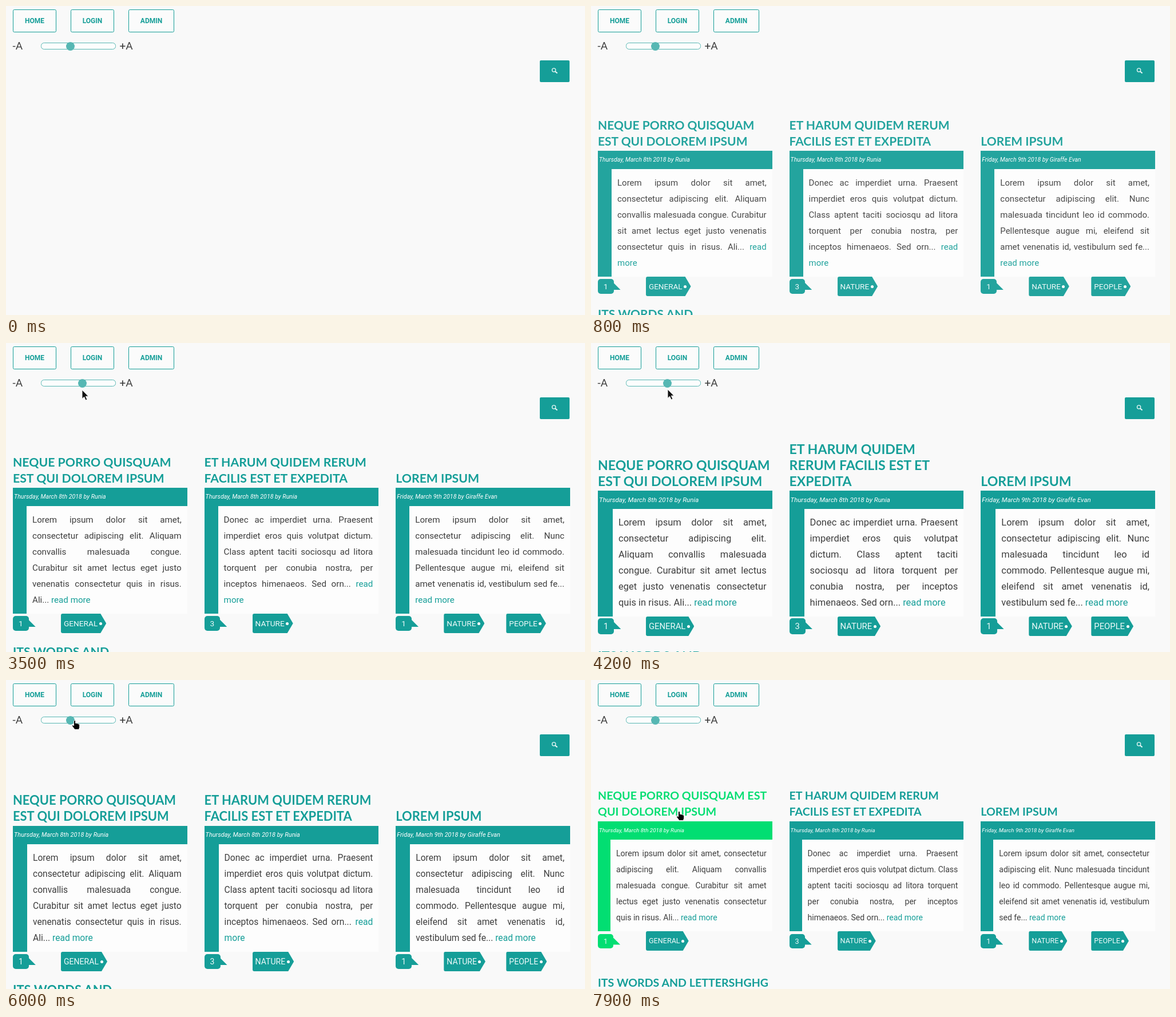
An HTML page that plays this animation: 1012 by 540 pixels, repeating every 8 s.

```html
<!DOCTYPE html>
<html lang="en">
<head>
<meta charset="utf-8">
<title>Blog text size</title>
<style>
  :root { --teal: #159e98; --accent: var(--teal); }
  html, body { margin: 0; width: 100%; height: 100%; overflow: hidden; background: #f9f9f9; }
  #stage { position: relative; width: 1012px; height: 540px; overflow: hidden;
    font-family: Roboto, sans-serif; color: #3e3e3e; background: #f9f9f9; }
  #stage > svg { position: absolute; left: 0; top: 0; }
  .card { position: absolute; width: 304.7px; line-height: 28px; }
  .card h2 { position: absolute; bottom: 100%; width: 100%; margin: 0 0 3px; color: var(--accent);
    font: 700 1.4em/28px Lato, sans-serif; text-transform: uppercase; }
  .date { padding: 2px; height: 28px; background: var(--accent); color: #fff; }
  .date i { font-size: .7em; display: block; line-height: 28px; }
  .text { padding: 10px; border-left: 1.6em solid var(--accent); background: #fdfdfd; text-align: justify; }
  .text span { color: var(--teal); }
  .foot { position: relative; height: 34px; display: flex; align-items: center; color: #eefafa; }
  .count { position: relative; padding: 5px 10px; border-radius: 5px; background: var(--accent);
    font-size: .9em; line-height: normal; }
  .count::after { content: ""; position: absolute; left: calc(100% - 1px); top: 7px; width: 13px; height: 12px;
    background: var(--accent); clip-path: polygon(0 0, 1px 0, 100% 100%, 0 100%); }
  .tag { position: absolute; top: 0; height: 34px; line-height: 34px; padding: 0 15px 0 5px;
    border-radius: 3px 0 0 3px; background: var(--teal);
    clip-path: polygon(0 0, calc(100% - 10px) 0, 100% 50%, calc(100% - 10px) 100%, 0 100%); }
  .tag::after { content: ""; position: absolute; right: 7.5px; top: 14.5px; width: 5px; height: 5px;
    border-radius: 50%; background: #fff; }
</style>
</head>
<body>
<div id="stage">
  <svg width="1012" height="540" font-family="Roboto, sans-serif">
    <g id="nav" font-size="12" font-weight="700" text-anchor="middle"></g>
    <g font-size="19" fill="#3e3e3e">
      <text x="11.5" y="76">-A</text>
      <text x="198.5" y="76">+A</text>
    </g>
    <rect x="61.5" y="64.5" width="130" height="11" rx="5" fill="#fdfdfd" stroke="#56b7b3"/>
    <circle id="thumb" cy="70.5" r="7.5" fill="#56b7b3"/>
    <rect x="933" y="95" width="52" height="38" rx="2" fill="#159e98"/>
    <g fill="none" stroke="#e4f5f4">
      <circle cx="957.6" cy="112" r="3.1" stroke-width="1.3"/>
      <path d="M960 114.4L963.6 117.6" stroke-width="2"/>
    </g>
  </svg>
  <div id="cards"></div>
  <svg width="1012" height="540">
    <path id="arrow" d="M0 0V15.5L3.6 12.2L6.2 18L8.8 16.8L6.3 11.2H11Z" fill="#111" stroke="#fff" stroke-width=".9"/>
    <path id="hand" d="M3.5 1.6Q5 -.6 6.5 1.6V5.6Q8 4.7 9 6Q10.4 5.4 11.2 6.7Q13.6 6.3 13.6 8.6V12.5L12.4 16.5H5.2L.6 10.4Q.3 8.4 2.2 8.8L3.5 10Z" fill="#000" stroke="#fff" stroke-width=".9"/>
  </svg>
</div>
<script>
const LOOP = 8000, STEP = 100;
const TEAL = '#159e98', GREEN = '#02de72';
const COLUMNS = [12, 346.6, 681.3];
const $ = id => document.getElementById(id);

const posts = [
  { title: 'Neque porro quisquam est qui dolorem ipsum', date: 'Thursday, March 8th 2018 by Runia', count: 1, tags: ['GENERAL'],
    text: 'Lorem ipsum dolor sit amet, consectetur adipiscing elit. Aliquam convallis malesuada congue. Curabitur sit amet lectus eget justo venenatis consectetur quis in risus. Ali...' },
  { title: 'Et harum quidem rerum facilis est et expedita', date: 'Thursday, March 8th 2018 by Runia', count: 3, tags: ['NATURE'],
    text: 'Donec ac imperdiet urna. Praesent imperdiet eros quis volutpat dictum. Class aptent taciti sociosqu ad litora torquent per conubia nostra, per inceptos himenaeos. Sed orn...' },
  { title: 'Lorem ipsum', date: 'Friday, March 9th 2018 by Giraffe Evan', count: 1, tags: ['NATURE', 'PEOPLE'],
    text: 'Lorem ipsum dolor sit amet, consectetur adipiscing elit. Nunc malesuada tincidunt leo id commodo. Pellentesque augue mi, eleifend sit amet venenatis id, vestibulum sed fe...' },
  { title: 'Its words and lettershghg' }
];

const postBody = p => `
  <div class="date"><i>${p.date}</i></div>
  <div class="text">${p.text} <span>read more</span></div>
  <div class="foot"><b class="count" style="font-weight:400">${p.count}</b>${
    p.tags.map((tag, i) => `<div class="tag" style="left:${84 + 109 * i}px">${tag}</div>`).join('')}</div>`;

$('cards').innerHTML = posts.map(p =>
  `<div class="card"><h2>${p.title}</h2>${p.text ? postBody(p) : ''}</div>`).join('');
$('nav').innerHTML = [['HOME', 12, 76], ['LOGIN', 113, 76], ['ADMIN', 214, 80]].map(([label, x, w]) =>
  `<g><rect x="${x + .5}" y="6.5" width="${w - 1}" height="39" rx="2"/><text x="${x + w / 2}" y="30">${label}</text></g>`).join('');

const cards = [...document.querySelectorAll('.card')];
const texts = [...document.querySelectorAll('.text')];
const tags = [...document.querySelectorAll('.tag')];
const buttons = [...$('nav').children];

const clamp = v => Math.min(1, Math.max(0, v));

// cubic-bezier(.25, .1, .25, 1)
function ease(v) {
  v = clamp(v);
  if (v === 0 || v === 1) return v;
  const curve = (u, a, b) => 3 * u * (1 - u) ** 2 * a + 3 * u * u * (1 - u) * b + u ** 3;
  let lo = 0, hi = 1;
  for (let i = 0; i < 24; i++) {
    const mid = (lo + hi) / 2;
    if (curve(mid, .25, .25) < v) lo = mid; else hi = mid;
  }
  return curve(lo, .1, 1);
}

// Linear interpolation through [input, ...outputs] rows.
function track(rows, v) {
  const next = rows.findIndex(r => r[0] > v);
  if (next === 0) return rows[0].slice(1);
  if (next < 0) return rows[rows.length - 1].slice(1);
  const a = rows[next - 1], b = rows[next], k = (v - a[0]) / (b[0] - a[0]);
  return a.slice(1).map((n, i) => n + (b[i + 1] - n) * k);
}

const fontSize = t => t < 5460
  ? 15 + 2 * ease((t - 3300) / 2000)
  : 17 - 3 * ease((t - 5460) / 2000);

const hoveredSize = t => t < 6280 ? fontSize(t) : 14.95 - .95 * ease((t - 6620) / 2000);

const sliderValue = t =>
  t < 3100 ? 14 : t < 3200 ? 15 : t < 3300 ? 16 : t < 5300 ? 17 : t < 5400 ? 16 : t < 5460 ? 15 : 14;

const barTop = [[14, 247.4], [15, 252.8], [15.67, 255], [17, 260]];

const pointer = [
  [2200, 158, 10], [2300, 148, 30], [2400, 139, 50], [2500, 129, 66], [2600, 122, 71], [3000, 122, 71],
  [3300, 130, 74], [3500, 133, 82], [4700, 135, 80], [4900, 134, 76], [5000, 134, 75], [5200, 133, 73],
  [5460, 115, 70], [6000, 115, 70], [6300, 128, 150], [6600, 137, 215], [7000, 139, 222], [7300, 149, 229]
];
const isHand = t => (t >= 2900 && t < 3400) || (t >= 4900 && t < 6100) || t >= 7200;

function place(card, x, y, size) {
  card.style.left = x + 'px';
  card.style.top = Math.round(y) + 'px';
  card.style.fontSize = size + 'px';
}

function drawCards(t) {
  const size = fontSize(t), [top] = track(barTop, size);
  $('cards').style.opacity = ease((t - 30) / 1100);
  COLUMNS.forEach((x, i) => place(cards[i], x, top, i ? size : hoveredSize(t)));
  cards[0].style.setProperty('--accent', t >= 6500 ? GREEN : TEAL);
  tags.forEach(tag => tag.style.fontSize = size * .9 + 'px');

  // The fourth card floats below the third, right of any taller neighbour.
  const [h1, h2, h3] = texts.map(el => el.offsetHeight);
  const column = h2 > h3 ? 2 : h1 > h3 ? 1 : 0;
  place(cards[3], COLUMNS[column], Math.round(top) + h3 + 142 + 3 * (size - 15), size);
}

function drawControls(t) {
  $('thumb').setAttribute('cx', 112.5 + 7 * (sliderValue(t) - 14));
  buttons.forEach((button, i) => {
    const hover = i === 1 && t >= 2200 && t < 2400;
    button.firstChild.setAttribute('fill', hover ? TEAL : '#fbfbfb');
    button.firstChild.setAttribute('stroke', TEAL);
    button.lastChild.setAttribute('fill', hover ? '#fff' : TEAL);
  });
}

function drawPointer(t) {
  const [x, y] = track(pointer, t), shown = t >= 2200;
  for (const id of ['arrow', 'hand']) {
    const active = shown && isHand(t) === (id === 'hand');
    $(id).setAttribute('visibility', active ? 'visible' : 'hidden');
    $(id).setAttribute('transform', `translate(${Math.round(x)} ${Math.round(y)})`);
  }
}

function render(t) {
  drawControls(t);
  drawCards(t);
  drawPointer(t);
}

const start = performance.now();
function tick() {
  const t = (performance.now() - start) % LOOP;
  render(Math.floor(t / STEP) * STEP);
  requestAnimationFrame(tick);
}
render(0);
requestAnimationFrame(tick);
</script>
</body>
</html>
```
